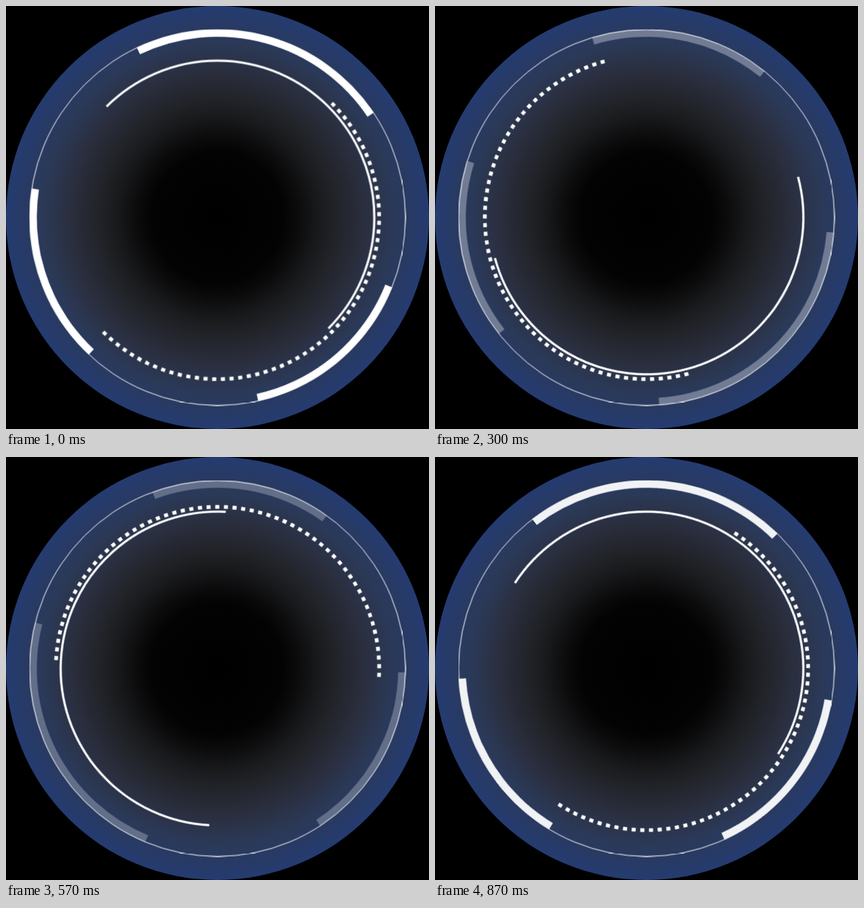
Animation of 577x577 px, one loop 0.9 s. Source, as an HTML page:

```html
<!DOCTYPE html>
<html lang="en">
<head>
<meta charset="utf-8">
<title>Spinner</title>
<style>
  html, body { margin: 0; width: 100%; height: 100%; overflow: hidden; background: #000; }
  svg { display: block; width: 100%; height: 100%; }
  .line { fill: none; stroke: #fff; }
  .spin { animation: spin 900ms steps(30) infinite; }
  .fade { animation: fade 900ms steps(15) infinite; }
  @keyframes spin { to { transform: rotate(360deg); } }
  @keyframes fade { 0%, 100% { opacity: 1; } 50% { opacity: 0; } }
</style>
</head>
<body>
<svg viewBox="-288.5 -288.5 577 577">
  <defs>
    <radialGradient id="glow" gradientUnits="userSpaceOnUse" cx="0" cy="0" r="288.5">
      <stop offset="0" stop-color="#000"/>
      <stop offset=".31" stop-color="#030303"/>
      <stop offset=".38" stop-color="#0b0b0c"/>
      <stop offset=".48" stop-color="#191a1c"/>
      <stop offset=".57" stop-color="#22242a"/>
      <stop offset=".69" stop-color="#2a2e3d"/>
      <stop offset=".825" stop-color="#2b3957"/>
      <stop offset=".965" stop-color="#263b6c"/>
      <stop offset="1" stop-color="#253b70"/>
    </radialGradient>
  </defs>
  <circle r="288.5" fill="url(#glow)"/>
  <g class="spin">
    <g class="fade">
      <!-- one long and two short bars, equal gaps -->
      <circle class="line" r="251.5" stroke-width="10" pathLength="360"
        stroke-dasharray="81.5 55.7 55.7 55.7 55.7 55.7" transform="rotate(-115.4)"/>
    </g>
    <path class="line" d="M214 0A214 214 0 0 1 -214 0" stroke-width="3" transform="rotate(-135)"/>
    <path class="line" d="M220.5 0A220.5 220.5 0 0 1 -220.5 0" stroke-width="5" pathLength="180"
      stroke-dasharray="1.45 1.628" transform="rotate(-45)"/>
  </g>
  <circle class="line" r="256.3" stroke-width="1"/>
</svg>
</body>
</html>
```
